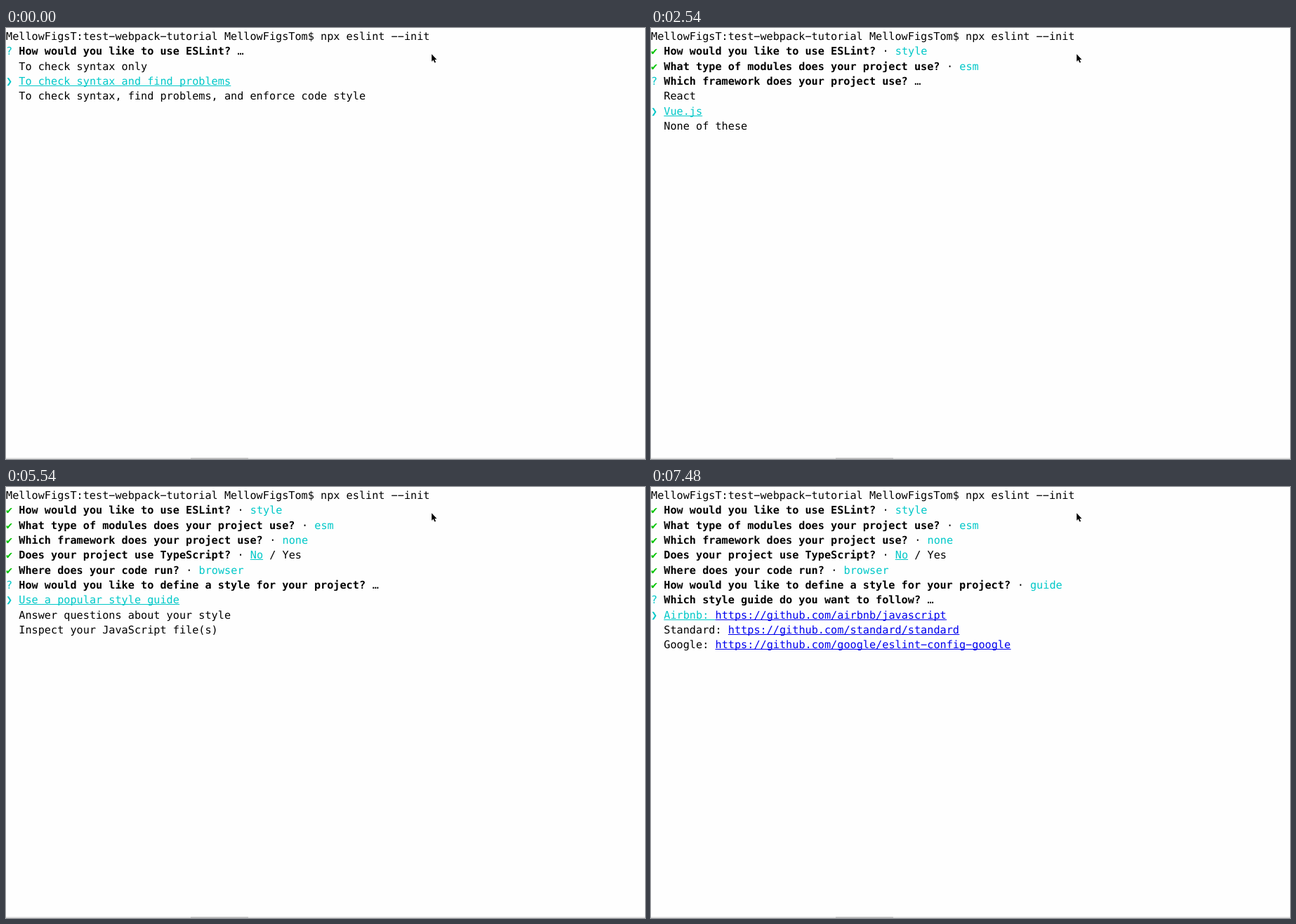
Recreate the animation shown at these times as an HTML page. Size 910 by 615 pixels, loop 8 s.

```html
<!DOCTYPE html>
<html lang="en">
<head>
<meta charset="utf-8">
<title>ESLint setup</title>
<style>
  html, body { margin: 0; width: 100%; height: 100%; overflow: hidden; background: #fefefe; }
  svg { display: block; width: 910px; height: 615px; }
  text {
    font: 15.2px "DejaVu Sans Mono", "Liberation Mono", monospace;
    text-rendering: geometricPrecision;
    white-space: pre;
    fill: #000;
  }
  .bold { font-weight: bold; }
  .cyan { fill: #00c8c8; }
  .green { fill: #00c400; }
  .gray { fill: #555; }
  .link { fill: #0000ee; }
  .screen { display: none; }
  .screen.on { display: inline; }
</style>
</head>
<body>
<svg id="stage" viewBox="0 0 910 615">
  <g id="term"></g>
  <path d="M606.7 38.3v10.6l2.4-2.2 1.8 3.9 1.6-.8-1.7-3.7h3.1z" fill="#000" opacity=".15"/>
  <path d="M606.2 37.2v10.6l2.4-2.2 1.8 3.9 1.6-.8-1.7-3.7h3.1z" fill="#000"/>
  <rect y="613.5" width="910" height="1.5" fill="#dcdcdc"/>
  <rect x="263" y="613.5" width="82" height="1.5" fill="#bcbcbc"/>
</svg>
<script>
const LOOP = 8000, CELL = 9.152, LINE = 21.333, BASE = 17;
const term = document.getElementById("term");

function add(parent, tag, attrs) {
  const el = document.createElementNS("http://www.w3.org/2000/svg", tag);
  for (const key in attrs) el.setAttribute(key, attrs[key]);
  return parent.appendChild(el);
}

// A run is [text, class, underlined]; runs follow each other on the cell grid.
function drawLine(parent, row, runs) {
  const y = BASE + row * LINE;
  let col = 0;
  for (const [text, cls = "", under] of runs) {
    const x = col * CELL;
    // The terminal face draws its hyphen as wide as a minus sign.
    add(parent, "text", { x, y, class: cls }).textContent = text.replace(/-/g, "\u2212");
    if (under) {
      add(parent, "rect", { x, y: Math.round(y) + 1, width: text.length * CELL, height: 1, class: cls });
    }
    col += text.length;
  }
}

const tick = ["✔", "green"];
const gap = [" "];
const noYes = [["No", "cyan", true], [" / Yes"]];
const word = text => [[text, "cyan"]];

const questions = [
  ["How would you like to use ESLint?", word("style")],
  ["What type of modules does your project use?", word("esm")],
  ["Which framework does your project use?", word("none")],
  ["Does your project use TypeScript?", noYes],
  ["Where does your code run?", word("browser")],
  ["How would you like to define a style for your project?", word("guide")],
  ["Which style guide do you want to follow?"]
];

// An option is a label with an optional link after it.
const pick = (options, chosen) => options.map(([label, url], i) => {
  const on = i === chosen;
  const runs = [on ? ["❯", "cyan"] : gap, gap, on ? [label, "cyan", true] : [label]];
  if (url) runs.push([url, "link", true]);
  return runs;
});

const list = (...labels) => labels.map(label => [label]);
const uses = list("To check syntax only", "To check syntax and find problems",
  "To check syntax, find problems, and enforce code style");
const modules = list("JavaScript modules (import/export)", "CommonJS (require/exports)", "None of these");
const frameworks = list("React", "Vue.js", "None of these");
const styles = list("Use a popular style guide", "Answer questions about your style",
  "Inspect your JavaScript file(s)");
const guides = [
  ["Airbnb: ", "https://github.com/airbnb/javascript"],
  ["Standard: ", "https://github.com/standard/standard"],
  ["Google: ", "https://github.com/google/eslint-config-google"]
];
const places = [
  [tick, gap, ["Browser", "cyan", true]],
  [["✔", "gray"], gap, ["Node"]]
];
const more = [[" …"]];
const hint = [[" …  (Press <space> to select, <a> to toggle all, <i> to invert selection)"]];

// [start, question, text after it, lines below]
const screens = [
  [0, 0, more, pick(uses, 1)],
  [300, 0, more, pick(uses, 2)],
  [590, 1, more, pick(modules, 0)],
  [1640, 2, more, pick(frameworks, 0)],
  [2540, 2, more, pick(frameworks, 1)],
  [2690, 2, more, pick(frameworks, 2)],
  [2990, 3, [[" › "], ...noYes], []],
  [4340, 4, hint, places],
  [5540, 5, more, pick(styles, 0)],
  [6440, 5, more, pick(styles, 1)],
  [7180, 5, more, pick(styles, 0)],
  [7480, 6, more, pick(guides, 0)]
];

drawLine(term, 0, [["MellowFigsT:test-webpack-tutorial MellowFigsTom$ npx eslint --init"]]);

const groups = screens.map(([, current, tail, below]) => {
  const g = add(term, "g", { class: "screen" });
  questions.slice(0, current).forEach(([text, answer], i) =>
    drawLine(g, i + 1, [tick, gap, [text, "bold"], [" · "], ...answer]));
  drawLine(g, current + 1, [["?", "cyan"], gap, [questions[current][0], "bold"], ...tail]);
  below.forEach((runs, i) => drawLine(g, current + 2 + i, runs));
  return g;
});

const begin = performance.now();
function frame() {
  const t = (performance.now() - begin) % LOOP;
  const now = screens.filter(([start]) => start <= t).length - 1;
  groups.forEach((g, i) => g.classList.toggle("on", i === now));
  requestAnimationFrame(frame);
}
frame();
</script>
</body>
</html>
```
